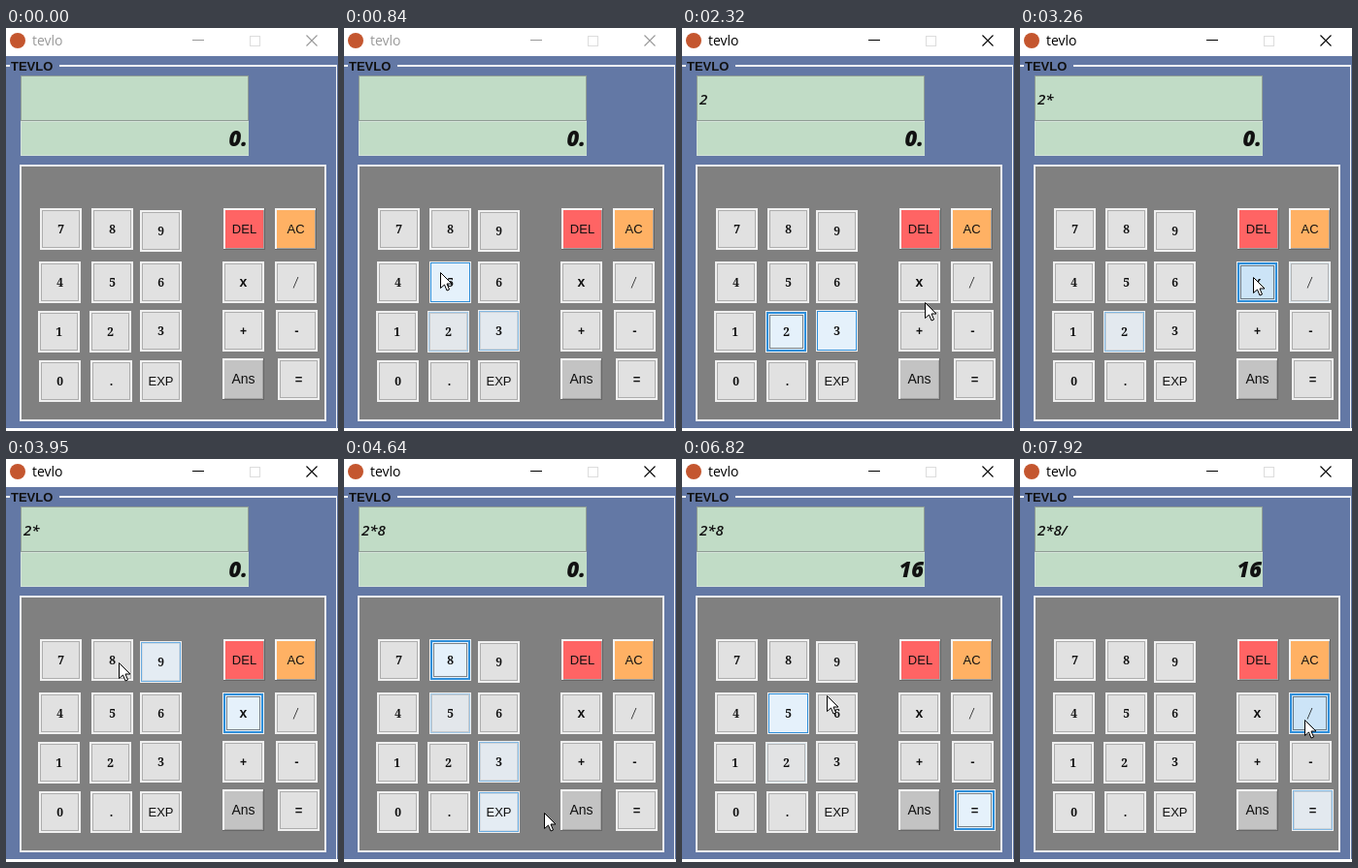
Animation of 342 by 416 pixels, one loop 8 s. Source, as an HTML page with a canvas:

```html
<!DOCTYPE html>
<html lang="en">
<head>
<meta charset="utf-8">
<title>Calculator</title>
<style>
html, body { margin: 0; width: 100%; height: 100%; overflow: hidden; background: #fff; }
canvas { display: block; }
</style>
</head>
<body>
<canvas id="stage" width="342" height="416"></canvas>
<script>
const ctx = document.getElementById('stage').getContext('2d');
const LOOP = 8000, STEPS = 103, STEP = LOOP / STEPS;
const SANS = '"Liberation Sans", Arial, sans-serif';
const SERIF = '"Noto Serif", serif';
const HUMAN = '"Open Sans", sans-serif';
const SIZE = 43;

// label, left, top, font, optional bevel colour
const digit = '600 12px ' + SERIF, word = '13px ' + SANS;
const buttons = [
  ['7', 35, 186, digit], ['8', 88, 186, digit], ['9', 138, 188, digit],
  ['DEL', 224, 186, word, '#ff6464'], ['AC', 277, 186, word, '#ffb164'],
  ['4', 34, 241, digit], ['5', 88, 241, digit], ['6', 138, 241, digit],
  ['x', 223, 241, 'bold 14px ' + SANS], ['/', 277, 241, 'italic 12px ' + SERIF],
  ['1', 33, 292, digit], ['2', 86, 292, digit], ['3', 138, 291, digit],
  ['+', 223, 291, 'bold 12px ' + SANS], ['-', 278, 291, 'bold 13px ' + SANS],
  ['0', 34, 343, digit], ['.', 87, 343, digit], ['EXP', 138, 343, word],
  ['Ans', 223, 341, '14px ' + SANS, '#c3c3c3'], ['=', 280, 341, 'bold 13px ' + SANS]
].map(([label, x, y, font, bevel]) => ({ label, x, y, font, bevel }));

// pointer path: step, x, y
const path = [
  [1, 235, 405], [5, 180, 345], [8, 118, 305], [9, 105, 272], [11, 99, 252],
  [12, 98, 250], [14, 100, 200], [16, 92, 175], [18, 75, 190], [19, 80, 220],
  [20, 95, 255], [22, 98, 276], [23, 105, 308], [27, 125, 314], [28, 150, 310],
  [29, 178, 300], [30, 250, 283], [34, 290, 265], [36, 268, 262], [38, 244, 258],
  [42, 240, 257], [45, 240, 257], [49, 180, 240], [51, 116, 210], [56, 110, 208],
  [57, 122, 262], [58, 150, 318], [59, 176, 352], [60, 206, 365], [62, 225, 383],
  [66, 258, 378], [69, 272, 394], [72, 300, 365], [78, 300, 365], [79, 250, 300],
  [80, 190, 235], [81, 118, 215], [82, 108, 265], [83, 106, 305], [84, 107, 275],
  [87, 120, 260], [88, 149, 244], [90, 182, 256], [93, 255, 262], [96, 293, 269],
  [102, 293, 269]
];
const presses = [['2', 25], ['x', 40], ['8', 52], ['=', 73], ['/', 100]];
const ACTIVE_FROM = 24;

function pointerAt(step) {
  if (step < 1) return null;
  const i = Math.max(1, path.findIndex(p => p[0] >= step));
  const [a, ax, ay] = path[i - 1], [b, bx, by] = path[i];
  const k = (step - a) / (b - a);
  return [ax + (bx - ax) * k, ay + (by - ay) * k];
}

const lastPress = step => presses.filter(p => p[1] <= step).pop() || ['', -9];

function contains(button, point) {
  if (!point) return false;
  const dx = point[0] - button.x, dy = point[1] - button.y;
  return dx >= 0 && dx < SIZE && dy >= 0 && dy < SIZE;
}

// Highlights rise quickly and fade slowly behind the pointer.
for (const button of buttons) {
  button.glow = [0];
  for (let s = 1; s < STEPS; s++) {
    const before = button.glow[s - 1];
    button.glow[s] = lastPress(s)[0] === button.label ? 1
      : contains(button, pointerAt(s - 1)) ? Math.min(1, before + 0.7)
      : Math.max(0, before - 0.15);
  }
}

function box(x, y, w, h, color) {
  ctx.fillStyle = color;
  ctx.fillRect(x, y, w, h);
}

function outline(x, y, w, h, color, width = 1) {
  ctx.strokeStyle = color;
  ctx.lineWidth = width;
  ctx.strokeRect(x + width / 2, y + width / 2, w - width, h - width);
}

function text(value, x, y, font, color = '#111', align = 'left') {
  ctx.font = font;
  ctx.fillStyle = color;
  ctx.textAlign = align;
  ctx.fillText(value, x, y);
}

function drawWindow(active) {
  const ink = active ? '#000' : '#999';
  box(0, 0, 342, 416, '#fff');
  ctx.fillStyle = '#c4562f';
  ctx.beginPath();
  ctx.arc(12, 13, 8, 0, Math.PI * 2);
  ctx.fill();
  text('tevlo', 27, 18, '14px ' + HUMAN, ink);
  box(192, 12, 12, 1, ink);
  outline(251, 8, 11, 11, '#ddd');
  ctx.strokeStyle = ink;
  ctx.lineWidth = 1.1;
  ctx.beginPath();
  ctx.moveTo(309.5, 7.5); ctx.lineTo(320.5, 18.5);
  ctx.moveTo(320.5, 7.5); ctx.lineTo(309.5, 18.5);
  ctx.stroke();

  box(0, 29, 342, 384, '#6378a5');
  box(0, 38, 4, 2, '#f4f4f4');
  box(55, 38, 286, 2, '#f4f4f4');
  box(340, 38, 1, 376, '#f4f4f4');
  text('TEVLO', 5, 44, 'bold 13px ' + SANS);

  box(14, 141, 316, 265, '#808080');
  outline(14, 141, 316, 265, '#eee', 2);
}

function drawDisplay(step) {
  const entry = [[26, '2'], [41, '2*'], [53, '2*8'], [102, '2*8/']]
    .filter(e => e[0] <= step).pop();
  box(15, 49, 235, 47, '#8f9c94');
  box(16, 50, 233, 45, '#c1dcc6');
  box(15, 96, 235, 36, '#d3e2d8');
  box(16, 97, 234, 34, '#c1dcc6');
  if (entry) text(entry[1], 18, 79, 'italic 600 15px ' + HUMAN);
  text(step >= 74 ? '16' : '0.', 249, 122, 'italic 800 22px ' + HUMAN, '#111', 'right');
}

function drawButton(button, step) {
  const { x, y, label, font, bevel } = button;
  const [pressedLabel, pressedAt] = lastPress(step);
  const focused = pressedLabel === label;
  if (bevel) {
    box(x, y, SIZE, SIZE, '#666');
    box(x, y, SIZE - 1, SIZE - 1, '#f4f4f4');
    box(x + 2, y + 2, SIZE - 3, SIZE - 3, '#a0a0a0');
    box(x + 2, y + 2, SIZE - 4, SIZE - 4, bevel);
  } else {
    box(x, y, SIZE, SIZE, '#f0f0f0');
    box(x + 2, y + 2, SIZE - 4, SIZE - 4, '#e1e1e1');
    outline(x + 2, y + 2, SIZE - 4, SIZE - 4, '#adadad');
    ctx.globalAlpha = button.glow[step];
    const held = focused && step - pressedAt < 3;
    box(x + 2, y + 2, SIZE - 4, SIZE - 4, held ? '#cce4f7' : '#e5f1fb');
    outline(x + 1, y + 1, SIZE - 2, SIZE - 2, '#2f8fda', focused ? 2 : 1);
    ctx.globalAlpha = 1;
    if (focused) {
      ctx.setLineDash([1, 1]);
      outline(x + 4, y + 4, SIZE - 8, SIZE - 8, '#111');
      ctx.setLineDash([]);
    }
  }
  text(label, x + SIZE / 2, y + 26, font, '#111', 'center');
}

function drawPointer(point) {
  if (!point) return;
  ctx.save();
  ctx.translate(Math.round(point[0]) + 0.5, Math.round(point[1]) + 0.5);
  ctx.beginPath();
  [[0, 0], [0, 16], [4, 12.5], [6.5, 18.5], [9, 17.5], [6.5, 11.5], [11.5, 11.5]]
    .forEach(([x, y]) => ctx.lineTo(x, y));
  ctx.closePath();
  ctx.fillStyle = '#fff';
  ctx.fill();
  ctx.strokeStyle = '#000';
  ctx.lineWidth = 1;
  ctx.stroke();
  ctx.restore();
}

function frame() {
  const time = performance.now() % LOOP;
  const step = Math.min(STEPS - 1, Math.floor(time / STEP + 0.27));
  drawWindow(step >= ACTIVE_FROM);
  drawDisplay(step);
  buttons.forEach(button => drawButton(button, step));
  drawPointer(pointerAt(step));
  requestAnimationFrame(frame);
}
frame();
</script>
</body>
</html>
```
